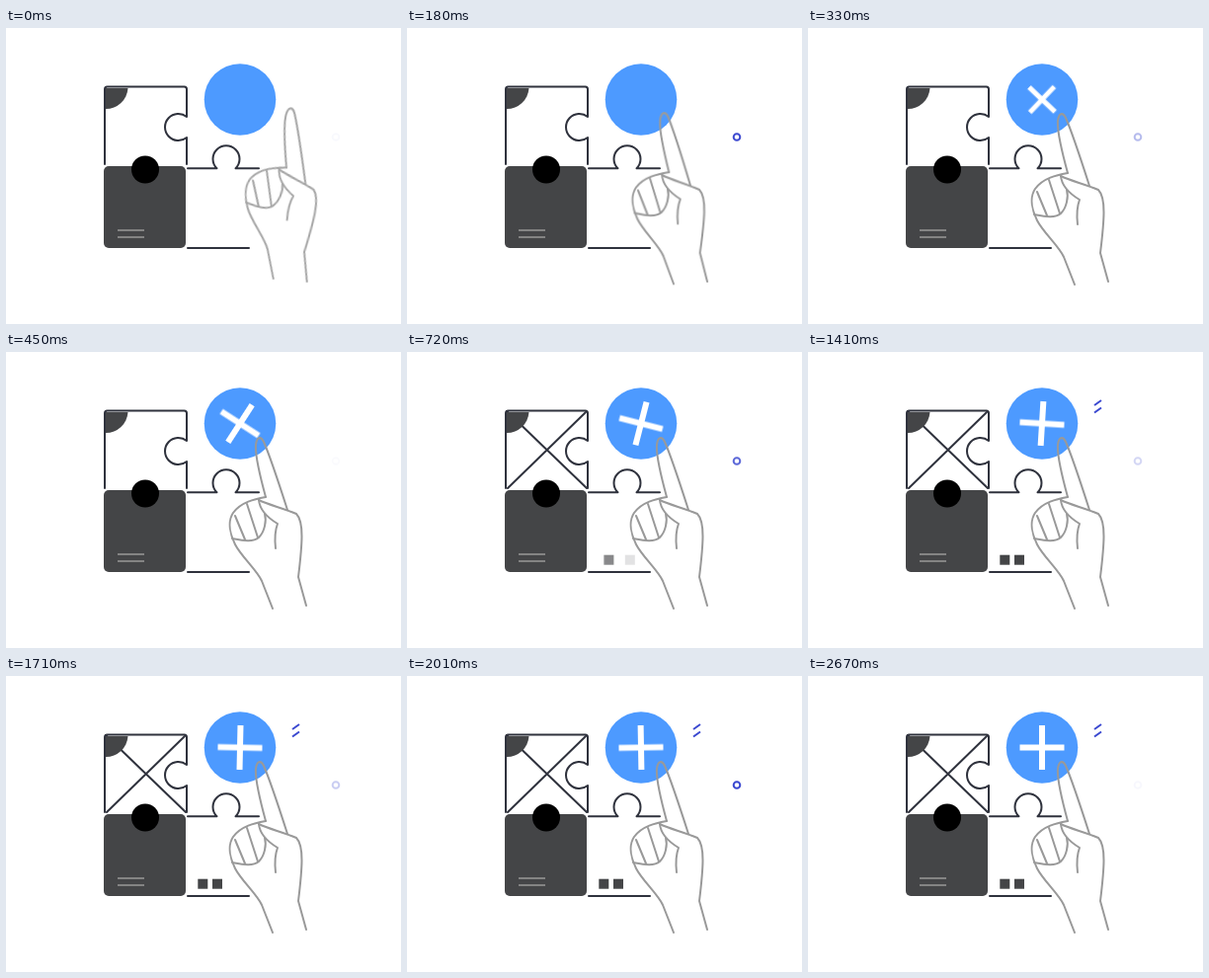
Animation of 400 by 300 pixels, one loop 2.73 s. Source, as an HTML page without scripts:

```html
<!DOCTYPE html>
<html lang="en">
<head>
<meta charset="utf-8">
<title>Puzzle</title>
<style>
  html, body { margin: 0; width: 100%; height: 100%; overflow: hidden; background: #fff; }
  svg { display: block; width: 100%; height: 100%; }
  .line { fill: none; stroke-width: 2; stroke-linecap: round; stroke-linejoin: round; }
  .ink { stroke: #2f323d; }
  .dark { fill: #444547; }
  .accent { stroke: #3a48d0; }

  .hand, .plus, .cross, .square, .tick { animation: 2730ms linear infinite both; }

  .hand { stroke: #999; transform-origin: 304px 261px; animation-name: press; }
  @keyframes press {
    0% { transform: rotate(10.3deg); stroke: #a6a6a6; animation-timing-function: ease; }
    11%, 100% { transform: rotate(0deg); stroke: #999; }
  }

  .plus { stroke: #fff; stroke-width: 6; transform-origin: 237px 72.5px; animation-name: settle; }
  @keyframes settle {
    0%, 7.69% { transform: rotate(58deg) scale(0); }
    13.2% { transform: rotate(40deg) scale(1); }
    16.48% { transform: rotate(33deg) scale(1); }
    19.78% { transform: rotate(25deg) scale(1); }
    24.18% { transform: rotate(17deg) scale(1); }
    29.67% { transform: rotate(10.5deg) scale(1); }
    36.26% { transform: rotate(6deg) scale(1); }
    51.65% { transform: rotate(3.5deg) scale(1); }
    73.63% { transform: rotate(-1deg) scale(1); }
    97.8%, 100% { transform: rotate(0deg) scale(1); }
  }

  .cross { animation-name: appear; }
  @keyframes appear {
    0%, 17% { opacity: 0; }
    26%, 100% { opacity: 1; }
  }

  .first { animation-name: slide-first; }
  @keyframes slide-first {
    0%, 20.9% { transform: translateX(14px); opacity: 0; animation-timing-function: ease-out; }
    33%, 100% { transform: none; opacity: 1; }
  }
  .second { animation-name: slide-second; }
  @keyframes slide-second {
    0%, 25% { transform: translateX(14px); opacity: 0; animation-timing-function: ease-out; }
    39.5%, 100% { transform: none; opacity: 1; }
  }

  .tick { stroke-linecap: butt; stroke-dasharray: 1 2; animation-name: draw; }
  @keyframes draw {
    0%, 32.9% { stroke-dashoffset: 1; }
    40.6%, 100% { stroke-dashoffset: 0; }
  }

  .dot { animation: blink 227.5ms ease-in-out -27.5ms infinite alternate; }
  @keyframes blink {
    from { opacity: 0; }
    to { opacity: 1; }
  }
</style>
</head>
<body>
<svg viewBox="0 0 400 300">
  <path class="line ink cross" d="M102 138L181 61M101 60L182 138"/>
  <path class="line ink" d="M100 138V62q0-2.5 2.5-2.5H180.500q2.500 0 2.500 2.500V90A13.500 13.500 0 1 0 183 111V138"/>
  <path class="dark" d="M101 61H123.500A22.500 22.500 0 0 1 101 82Z"/>

  <rect class="dark" x="99" y="140" width="83" height="83" rx="5"/>
  <circle cx="141" cy="143.500" r="14"/>
  <path d="M113 205H140M113 212H140" stroke="#999" stroke-width="1.500"/>

  <path class="line ink" d="M184 142.300H213.500A13.500 13.500 0 1 1 232.500 142.300H256M184 223H246"/>
  <rect class="dark square first" x="194.300" y="205.700" width="10" height="10"/>
  <rect class="dark square second" x="209" y="205.700" width="10" height="10"/>

  <circle cx="237" cy="72.500" r="36.300" fill="#4d9aff"/>
  <path class="plus" d="M237 50V95M214.500 72.500H259.500"/>

  <path class="line accent tick" pathLength="1" d="M297 49L290 54"/>
  <path class="line accent tick" pathLength="1" d="M290 61.500L297 56.500"/>
  <circle class="line accent dot" cx="334" cy="110.500" r="3.300"/>

  <g class="line hand">
    <path d="M263 147C257 125 252 105 253 94C254 86 258 85 261 91C265 100 276 132 285 160"/>
    <path d="M263 147C252 149 238 152 230 163C224 172 227 185 232 195C238 207 254 221 259 232L270 260"/>
    <path d="M229 189C240 191 250 193 256 188C262 182 264 171 262 164"/>
    <path d="M232 166L242 190M244 154L255 188"/>
    <path d="M256 150C257 161 265 168 275 174C272 182 272 190 273 199"/>
    <path d="M256 150C266 155 280 158 294 164C302 172 300 195 296 228L304 257"/>
  </g>
</svg>
</body>
</html>
```
